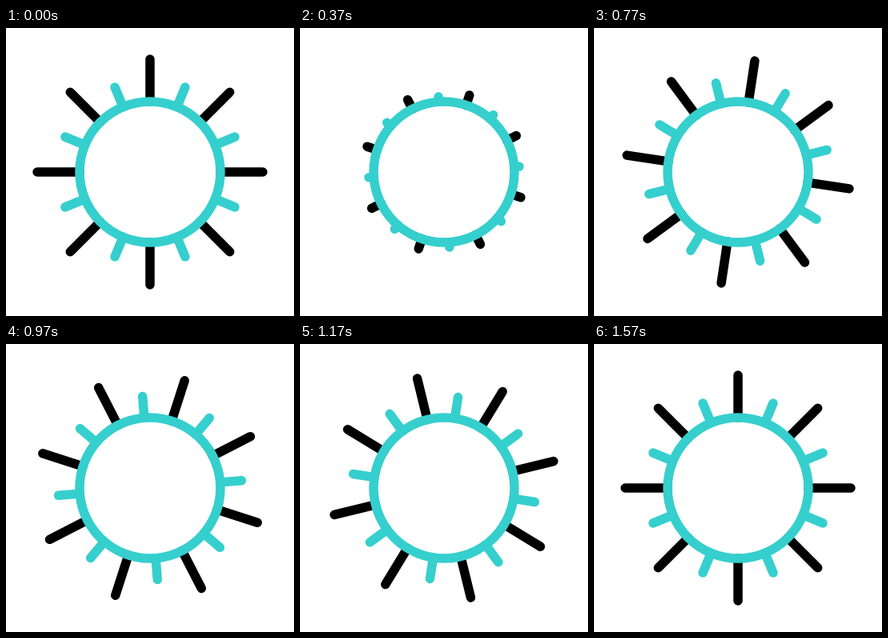
Write an HTML page that moves like this. It is 360 px wide and 360 px high and loops after 1670 ms.

```html
<!DOCTYPE html>
<html lang="en">
<head>
<meta charset="utf-8">
<title>Sun</title>
<style>
  html, body { margin: 0; width: 100%; height: 100%; overflow: hidden; background: #fff; }
  svg { display: block; width: 100vw; height: 100vh; }
  path, circle { fill: none; stroke-width: 11.5; stroke-linecap: round; }
  .long { stroke: #000; }
  .short, .ring { stroke: #35cfce; }
</style>
</head>
<body>
<svg viewBox="0 0 360 360">
  <g transform="translate(180 180)">
    <g id="rays">
      <path class="long" id="long"/>
      <path class="short" id="short"/>
    </g>
    <circle class="ring" r="88"/>
  </g>
</svg>
<script>
const LOOP = 1670, STEP = 33.4, LAST = 47;
const RING = 88;

// Keys: [time in ms, value], eased in and out between neighbours
const TURN = [[0, 0], [600, -38.8], [1570, 0]];
const LONG = [[0, 141], [400, 100.6], [800, 141]];
const SHORT = [[0, 114.8], [400, 94], [800, 114.8]];

const $ = id => document.getElementById(id);

// Same curve as CSS ease-in-out: cubic-bezier(.42, 0, .58, 1)
function ease(x) {
  let lo = 0, hi = 1;
  for (let i = 0; i < 24; i++) {
    const s = (lo + hi) / 2;
    if (1.26 * s - 0.78 * s * s + 0.52 * s ** 3 < x) lo = s; else hi = s;
  }
  return lo * lo * (3 - 2 * lo);
}

function valueAt(keys, t) {
  for (let i = 1; i < keys.length; i++) {
    const [t0, a] = keys[i - 1], [t1, b] = keys[i];
    if (t < t1) return a + (b - a) * ease((t - t0) / (t1 - t0));
  }
  return keys[keys.length - 1][1];
}

function spokes(end, offset) {
  let d = '';
  for (let i = 0; i < 8; i++) {
    const a = (i * 45 + offset) * Math.PI / 180;
    const at = r => (r * Math.sin(a)).toFixed(3) + ' ' + (-r * Math.cos(a)).toFixed(3);
    d += 'M' + at(RING) + 'L' + at(end);
  }
  return d;
}

function draw(now) {
  // 30 pictures per second, then a short rest on the last one
  const step = Math.min(LAST, Math.floor((now % LOOP) / (1000 / 30) + 0.11));
  const t = step * STEP;
  $('rays').setAttribute('transform', `rotate(${valueAt(TURN, t).toFixed(3)})`);
  $('long').setAttribute('d', spokes(valueAt(LONG, t), 0));
  $('short').setAttribute('d', spokes(valueAt(SHORT, t), 22.5));
}

const start = performance.now();
function tick() {
  draw(performance.now() - start);
  requestAnimationFrame(tick);
}
tick();
</script>
</body>
</html>
```
